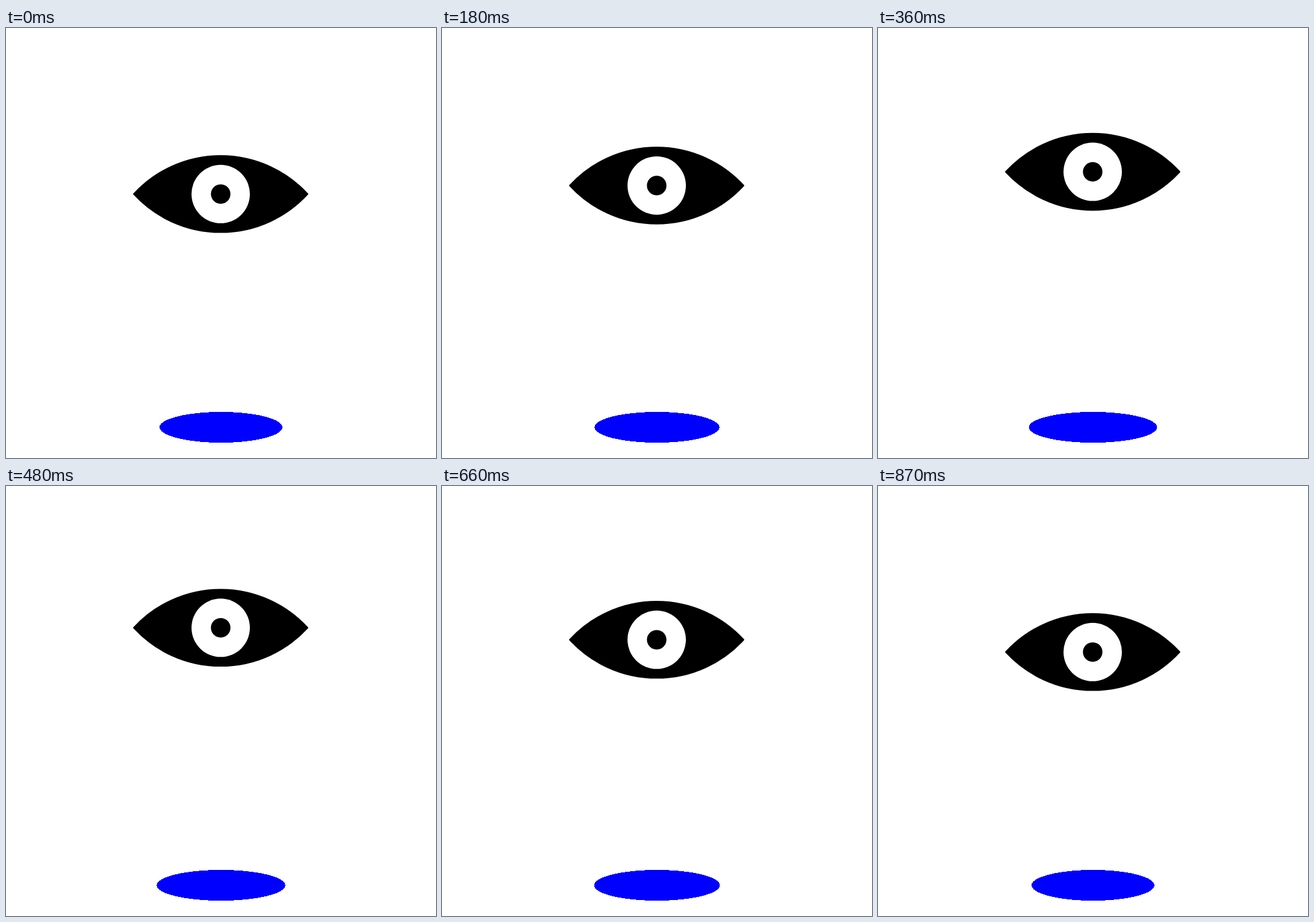
Recreate the animation shown at these times as an HTML page. Size 700x700 px, loop 0.9 s.

```html
<!DOCTYPE html>
<html lang="en">
<head>
<meta charset="utf-8">
<title>Floating eye</title>
<style>
  html, body { margin: 0; width: 100%; height: 100%; overflow: hidden; background: #fff; }
  svg { display: block; width: 100vw; height: 100vh; }
</style>
</head>
<body>
<svg viewBox="0 0 700 700">
  <ellipse id="shadow" cx="350" cy="650" rx="100" ry="25" fill="#00f" shape-rendering="crispEdges"/>
  <g id="eye" transform="translate(349.5 270.3)">
    <path d="M-141 0A191.7 191.7 0 0 1 141 0A191.7 191.7 0 0 1 -141 0Z"
          stroke="#000" stroke-width="3" stroke-linejoin="round"/>
    <circle r="47.5" fill="#fff"/>
    <circle r="15.9"/>
  </g>
</svg>
<script>
  const LOOP = 900, STEP = 30, PEAK = 450, END = 870;
  const eye = document.getElementById('eye');
  const shadow = document.getElementById('shadow');

  const ease = x => (1 - Math.cos(Math.PI * x)) / 2;

  // Height of the eye, 0 at rest and 1 at the top
  function lift(t) {
    return ease(t <= PEAK ? t / PEAK : (END - t) / (END - PEAK));
  }

  function draw(ms) {
    const t = Math.floor((ms % LOOP) / STEP) * STEP;
    const h = lift(t);
    eye.setAttribute('transform', `translate(349.5 ${270.3 - 40 * h})`);
    shadow.setAttribute('rx', 100 + 4.8 * h);
  }

  const start = performance.now();
  function tick(now) {
    draw(Math.max(0, now - start));
    requestAnimationFrame(tick);
  }
  draw(0);
  requestAnimationFrame(tick);
</script>
</body>
</html>
```
